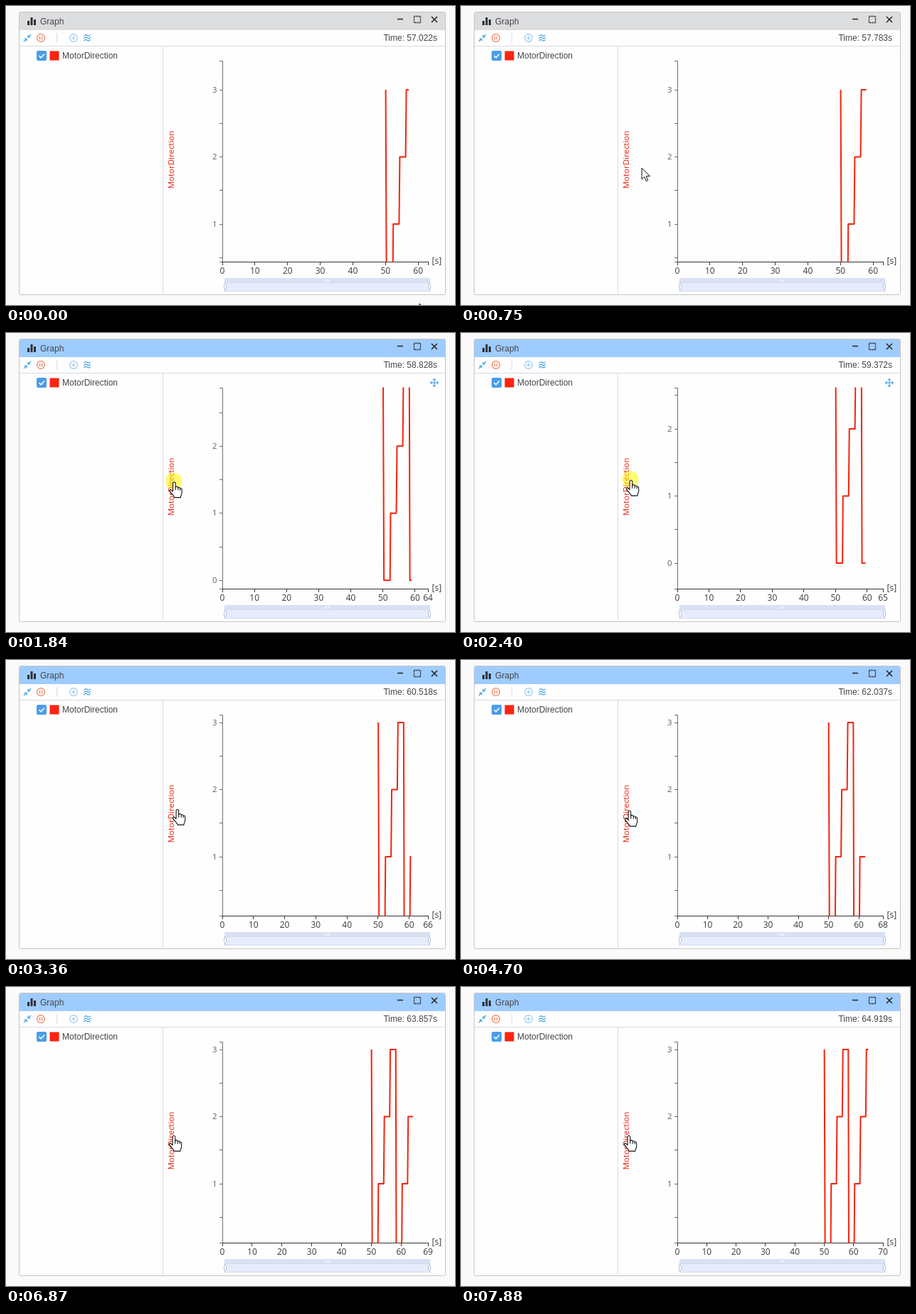
Recreate the animation shown at these times as an HTML page. Size 631 by 421 pixels, loop 8000 ms.

```html
<!DOCTYPE html>
<html lang="en">
<head>
<meta charset="utf-8">
<title>Graph</title>
<style>
  html, body { margin: 0; width: 100%; height: 100%; overflow: hidden; background: #fafafa; }
  svg { display: block; }
  text { font: 12px "Liberation Sans", Arial, sans-serif; fill: #484448; }
  .chart text { font: 12px "Open Sans", "Noto Sans", sans-serif; fill: #3a3a3c; }
  .chart .yl { font-size: 11.4px; fill: #625f64; }
  .chart .name { font-size: 11.5px; fill: #ee1c08; }
  .mid { text-anchor: middle; }
  .end { text-anchor: end; }
  .line { fill: none; }
</style>
</head>
<body>
<svg width="631" height="421" viewBox="0 0 631 421">
  <defs><clipPath id="plot"><rect x="304" y="76.5" width="292" height="284"/></clipPath></defs>

  <rect x="18.5" y="8.5" width="599" height="398" rx="2" fill="#fefefe" stroke="#c4c4c6"/>
  <path id="bar" d="M19 34V11q0-2 2-2H615q2 0 2 2V34z"/>
  <path d="M19 56.5H617M220.5 57V405" stroke="#d9dbe2"/>

  <path d="M30 21h3v6h-3zM34.5 16h3v11h-3zM39 19h3v8h-3z" fill="#2f3033"/>
  <text x="48" y="26">Graph</text>
  <path d="M550 18.5h8M598 15l8 8M606 15l-8 8" stroke="#222" stroke-width="1.5"/>
  <rect x="573.5" y="14.5" width="9" height="9" class="line" stroke="#222" stroke-width="1.3" stroke-dasharray="2 1"/>

  <g class="line" stroke="#3f9fe4" stroke-width="1.2">
    <path d="M35 40l-4 4M31 40.8V44h3.4M25 50l4-4M25.6 46H29v3.4"/>
    <path id="wave" d="M109.5 42.5q2.3-3 4.600-1t4.600-1"/>
    <use href="#wave" y="3.3"/><use href="#wave" y="6.6"/>
  </g>
  <g class="line" stroke="#f07a50" stroke-width="1.2">
    <circle cx="49" cy="45" r="5.4"/><path d="M47.5 42.5v5M50.5 42.5v5"/>
  </g>
  <path d="M71.5 38v14" stroke="#d9dbe2"/>
  <g class="line" stroke="#92c6f2" stroke-width="1.1">
    <circle cx="95" cy="45" r="5.4"/><path d="M92 45h6M95 42v6"/>
  </g>
  <text id="clock" class="end" x="606" y="49"></text>

  <rect x="43" y="63" width="14" height="14" rx="2" fill="#4b9de8"/>
  <path d="M46.5 70l2.6 2.8 4.8-5.3" class="line" stroke="#fff" stroke-width="1.5"/>
  <rect x="61.5" y="63.500" width="13" height="13" fill="#fb2310"/>
  <text x="79" y="74">MotorDirection</text>

  <g class="chart">
    <text class="name mid" transform="translate(236 216.5) rotate(-90)">MotorDirection</text>
    <path d="M300 77.5h4.5V360M300 360.5h4" class="line" stroke="#6e6a78"/>
    <path id="yticks" class="line" stroke="#6e6a78"/>
    <path d="M304 360.5H593" stroke="#333"/>
    <path id="xticks" class="line" stroke="#333"/>
    <g id="ylabels"></g>
    <g id="xlabels"></g>
    <text x="598.5" y="363">[s]</text>
    <path id="data" class="line" stroke="#f5220d" stroke-width="2" stroke-linejoin="round" clip-path="url(#plot)"/>
  </g>

  <rect x="307" y="383" width="289" height="7" rx="1" fill="#d9e1f4"/>
  <rect x="307.5" y="389.5" width="288" height="12" fill="#e6ecfc" stroke="#d3dbee"/>
  <path d="M448.5 385v3M451 385v3M453.5 385v3" stroke="#fff"/>
  <g fill="#fff" stroke="#b4bdd0">
    <path d="M307.5 389v13M595.5 389v13"/>
    <rect x="306.5" y="391.5" width="3" height="7" rx="1"/>
    <rect x="593.5" y="391.5" width="3" height="7" rx="1"/>
  </g>

  <path id="move" d="M596.5 70h11M602 64.5v11M598.5 68l-2 2 2 2M605.5 68l2 2-2 2M600 66.5l2-2 2 2M600 73.5l2 2 2-2"
        class="line" stroke="#6fb2ee" stroke-width="1.4"/>

  <g id="cursor">
    <circle id="press" r="11.7" fill="#fff700" opacity=".55"/>
    <g id="hand" transform="translate(0 2) scale(.9)" fill="#fff" stroke="#111" stroke-width="1.2" stroke-linejoin="round">
      <path d="M-1 1.5C-1-1.5 3-1.5 3 1.5V7C5 5.5 6.5 6.5 7 8C8.5 7 10 7.7 10.3 9.2C11.8 8.5 13 9.5 13 11V16C13 19 11 20 11 23.5H1.5C.5 20-3 18-6 13.5C-7 11.5-4.5 10.5-3 12L-1 14Z"/>
      <path d="M3 7v5M7 8v4M10.3 9.2v3.3" class="line"/>
    </g>
    <path id="arrow" d="M0 0V16l3.7-3.5 2.5 6 2.5-1-2.5-6H11.3z" fill="#fff" stroke="#111"/>
  </g>
</svg>
<script>
const LOOP = 8000, LEFT = 304, WIDTH = 289, TOP = 77, BOTTOM = 360, UNIT = 94.5;
const $ = id => document.getElementById(id);

// key readings of the clock: [ms, seconds, updates until the next key]
const readings = [
  [0, 57.022, 9], [1220, 58.392, 9], [2400, 59.372, 7], [3360, 60.518, 2],
  [4160, 61.1, 2], [4700, 62.037, 3], [5650, 62.85, 2], [6870, 63.857, 4], [7680, 64.919, 1]
];

// the signal climbs 0, 1, 2, 3 and wraps, one level every two seconds
const signal = [[50.05, 3], [50.3, 0]];
for (let i = 1; i < 8; i++) {
  const at = 50.2 + 2 * i, level = i % 4;
  signal.push([at - (level > 1 ? .05 : 0), (i - 1) % 4], [at + .17, level]);
}

const lerp = (a, b, k) => a + (b - a) * k;
const within = (t, a, b) => t >= a && t < b;
const show = (id, on) => $(id).setAttribute('visibility', on ? 'visible' : 'hidden');
const label = (cls, x, y, s) => `<text class="${cls}" x="${x}" y="${y}">${s}</text>`;
const crisp = v => Math.floor(v) + .5;

// eased 0 to 1 between two times
function ramp(t, from, to) {
  const k = Math.min(1, Math.max(0, (t - from) / (to - from)));
  return k * k * (3 - 2 * k);
}

function seconds(t) {
  const n = readings.filter(r => r[0] <= t).length - 1;
  const [t0, s0, steps] = readings[n];
  const [t1, s1] = readings[n + 1] || [LOOP, s0];
  return lerp(s0, s1, Math.floor((t - t0) / (t1 - t0) * steps) / steps);
}

function drawAxes(max, xOf, yOf) {
  let ticks = 'M593.5 360v5', labels = '';
  const marks = [0, 10, 20, 30, 40, 50, 60];
  if (max >= 64) marks.push(max);
  for (const m of marks) {
    ticks += `M${crisp(xOf(m))} 360v5`;
    labels += label('mid', xOf(m), 377, m);
  }
  $('xticks').setAttribute('d', ticks);
  $('xlabels').innerHTML = labels;

  ticks = labels = '';
  for (let v = 0; v <= 3; v += .5) {
    const y = yOf(v);
    if (y < TOP || y > BOTTOM) continue;
    ticks += `M300 ${crisp(y)}h4`;
    if (v % 1 === 0) labels += label('yl end', 296.5, y + 3.500, v);
  }
  $('yticks').setAttribute('d', ticks);
  $('ylabels').innerHTML = labels;
}

function drawData(end, xOf, yOf) {
  const pts = signal.filter(p => p[0] < end);
  const last = pts[pts.length - 1], next = signal[pts.length];
  const level = next ? lerp(last[1], next[1], (end - last[0]) / (next[0] - last[0])) : last[1];
  pts.push([end, level]);
  $('data').setAttribute('d', 'M' + pts.map(([s, v]) => `${xOf(s)} ${yOf(v)}`).join('L'));
}

function draw(t) {
  const pose = Math.floor(t / 70) * 70;
  const enter = ramp(pose, 70, 820), pull = ramp(pose, 1350, 2100), back = ramp(pose, 2540, 3290),
        nudge = ramp(pose, 3650, 3920), settle = ramp(pose, 5170, 5650);

  const secs = seconds(t);
  const max = Math.ceil(secs + 5);
  const zero = 401.5 - 77.5 * pull + 47.5 * back;
  const xOf = s => LEFT + s * WIDTH / max;
  const yOf = v => zero - v * UNIT;

  $('clock').textContent = `Time: ${secs.toFixed(3)}s`;
  $('bar').setAttribute('fill', t < 1420 ? '#dcdddf' : '#9fccff');
  drawAxes(max, xOf, yOf);
  drawData(secs + .1, xOf, yOf);

  const x = 581 - 351 * enter + 8 * pull + 2 * back - 4 * nudge - settle;
  const y = 419 - 205 * enter - 8 * pull + 3 * back + 2 * nudge - 3 * settle;
  $('cursor').setAttribute('transform', `translate(${x} ${y})`);
  show('hand', x < 244);
  show('arrow', x >= 244);
  show('press', within(t, 1090, 3290) || within(t, 5310, 5580));
  show('move', within(t, 1420, 3360) || within(t, 5310, 5650));
}

const start = performance.now();
function tick() {
  draw((performance.now() - start) % LOOP);
  requestAnimationFrame(tick);
}
tick();
</script>
</body>
</html>
```
